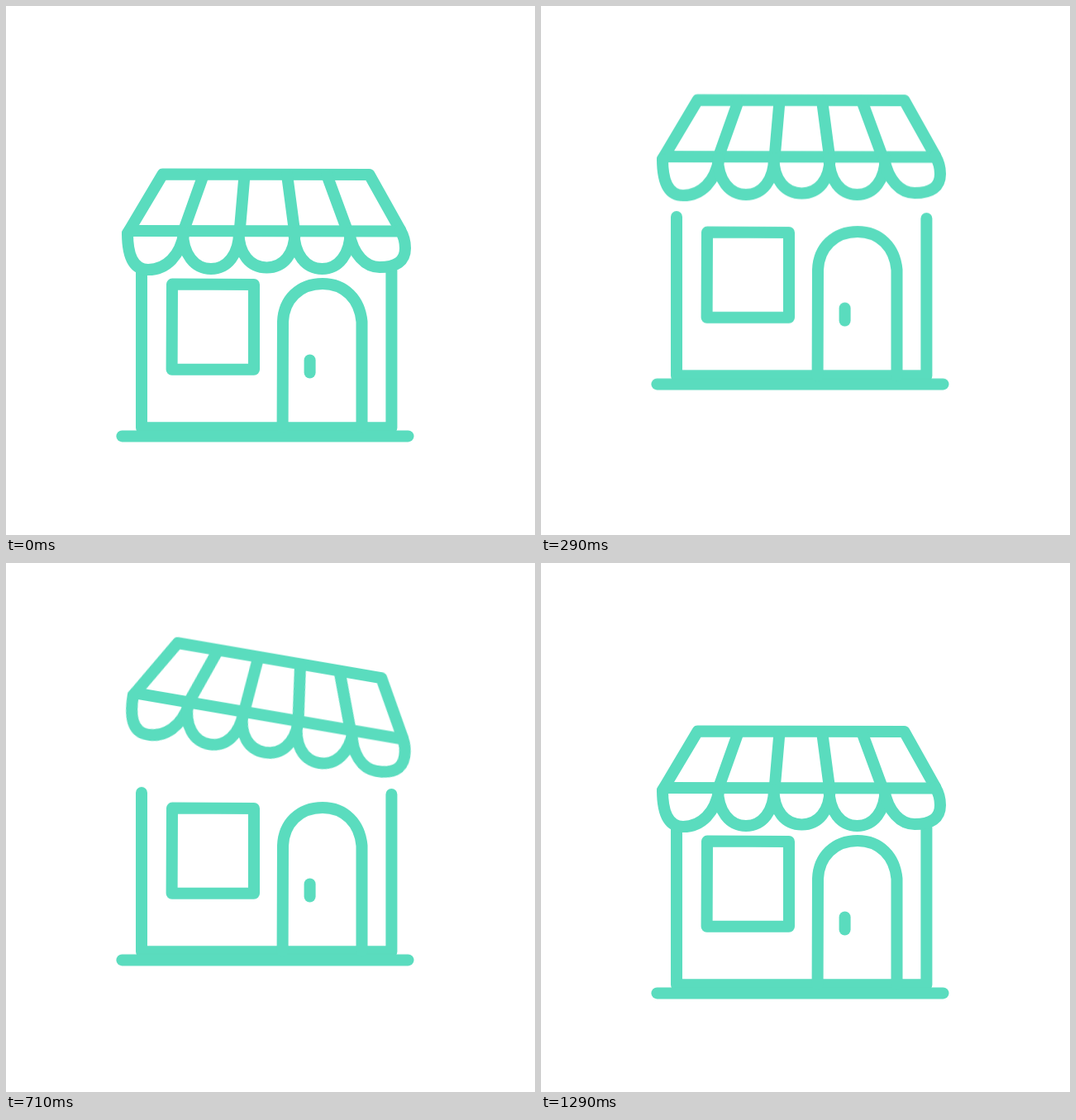
Write an HTML page that moves like this. It is 640 by 640 pixels and loops after 3280 ms.

```html
<!DOCTYPE html>
<html lang="en">
<head>
<meta charset="utf-8">
<title>Shop</title>
<style>
  html, body { margin: 0; width: 100%; height: 100%; overflow: hidden; background: #fff; }
  svg { display: block; width: 100%; height: 100%; }
  g { fill: none; stroke: #5adcbe; stroke-width: 14; stroke-linecap: round; stroke-linejoin: round; }
  #awning { transform-origin: 490px 287px; }
</style>
</head>
<body>
<svg viewBox="0 0 640 640">
  <g id="shop">
    <path d="M164 318V510.2H466.4V320"/>
    <path d="M140.4 520.4H486.5"/>
    <path d="M201 336.6L300 337V439.8H200.6Z"/>
    <path d="M334.6 510L335 382C336 355 355 336 383 336C410 336 428 355 430.5 382V510"/>
    <path d="M367.6 428.5V443.5"/>
  </g>
  <g id="awning">
    <path d="M147 275L189.5 203.6L439.5 204L477 271"/>
    <path d="M149 272L477 272.4"/>
    <path d="M239 204L214.8 272M288.6 204L282.7 272M340 204L349 272M388 204L413 272"/>
    <path d="M147 275C147 300 153 319 172 319C194 319 211 302 215.5 274"/>
    <path id="scallops"/>
    <path d="M415 274C420 301 435 316 452 316C472 316 483 309 483 293C483 286 481 278 477 271"/>
  </g>
</svg>
<script>
  const LOOP = 3280, FPS = 14, BEAT = 3;
  const REST = 6 * BEAT;

  // Rounded lobe hanging from the edge of the awning
  function scallop(mid, bottom) {
    const top = 274, half = 34, bend = 20, side = 300;
    const left = mid - half, right = mid + half;
    return `M${left} ${top}C${left} ${side} ${mid - bend} ${bottom} ${mid} ${bottom}` +
      `C${mid + bend} ${bottom} ${right} ${side} ${right} ${top}`;
  }
  document.getElementById("scallops").setAttribute("d",
    scallop(248, 318) + scallop(315.5, 316.5) + scallop(382.5, 318));

  const clamp = p => Math.min(1, Math.max(0, p));
  const span = (k, from, to) => clamp((k - from) / (to - from));
  const hop = p => 4 * p * (1 - p);
  const easeOut = p => 1 - (1 - p) ** 2;
  const easeInOut = p => (1 - Math.cos(Math.PI * p)) / 2;

  // A straight jump, a tilted jump with a slow landing, then a small awning bounce
  function pose(k) {
    const jump = hop(span(k, 0, 2 * BEAT));
    const rise = easeOut(span(k, 2 * BEAT, 3 * BEAT));
    const fall = easeInOut(span(k, 3 * BEAT, 5 * BEAT));
    const tilt = 9.76 * hop(span(k, 2 * BEAT, 5 * BEAT)) ** 0.7;
    const bounce = hop(span(k, 5 * BEAT, REST));
    const shop = 70.8 * jump + 43 * (rise - fall);
    const awning = shop + 30.2 * jump + 1.8 * tilt + 25 * bounce;
    return { shop, awning, tilt };
  }

  const startOf = k => Math.round(k * 100 / FPS) * 10;

  function play(id, toTransform) {
    const frames = [];
    for (let k = 0; k <= REST; k++) {
      frames.push({
        offset: startOf(k) / LOOP,
        transform: toTransform(pose(k)),
        easing: "steps(1, end)"
      });
    }
    frames.push({ offset: 1, transform: toTransform(pose(REST)) });
    document.getElementById(id).animate(frames, { duration: LOOP, iterations: Infinity });
  }

  play("shop", p => `translateY(${-p.shop}px)`);
  play("awning", p => `translateY(${-p.awning}px) rotate(${p.tilt}deg)`);
</script>
</body>
</html>
```
